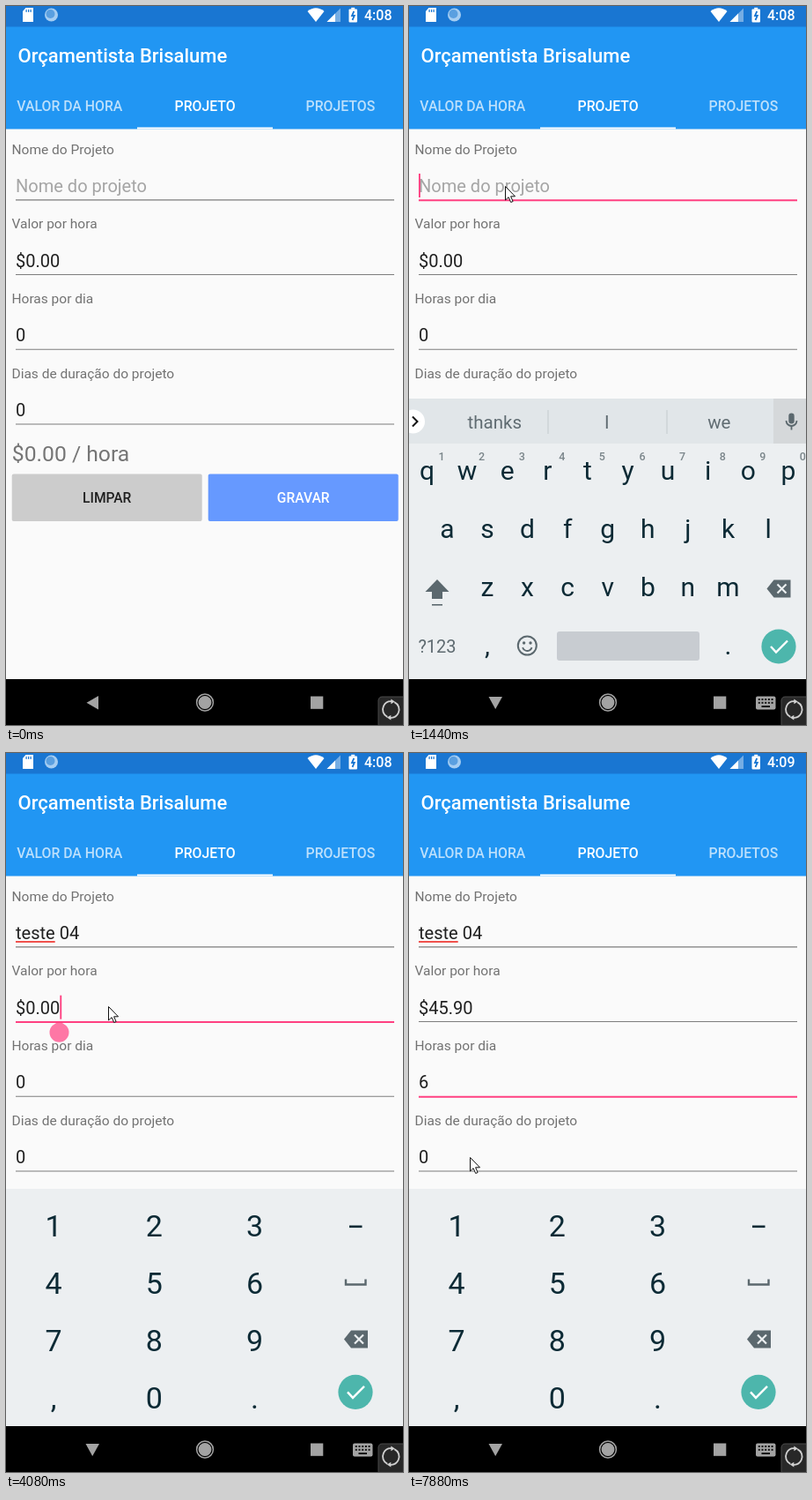
Write an HTML page with a canvas that moves like this. It is 451x815 px and loops after 8000 ms.

```html
<!DOCTYPE html>
<html lang="pt">
<head>
<meta charset="utf-8">
<title>Orçamentista Brisalume</title>
<style>
html, body { margin: 0; width: 100%; height: 100%; overflow: hidden; background: #fafafa; }
canvas { display: block; }
</style>
</head>
<body>
<canvas id="stage" width="451" height="815"></canvas>
<script>
const ctx = document.getElementById('stage').getContext('2d');
const under = document.createElement('canvas');
under.width = 451;
under.height = 815;

const LOOP = 8000, ROW = 84.7, TAU = 2 * Math.PI;
const PINK = '#ff4081', KEY = '#0c2a35', ICON = '#5b686e', NAV = '#a3a3a3', PANEL = '#eceff1';
const FOCUS = [980, 4000, 5600];

// Key i of a word is pressed at start + a*i + b*i*i
const keyTimes = (word, start, a, b) => [...word].map((_, i) => start + a * i + b * i * i);
const words = {
  name: ['teste 04', 1670, 100, 11],
  cents: ['4590', 4380, 250, -20],
  hours: ['6', 7190, 0, 0]
};
const typed = (key, t) => words[key][0].slice(0, keyTimes(...words[key]).filter(k => k <= t).length);

// The caret blinks with a one second period, restarted by focus and typing
const resets = [...FOCUS, ...Object.values(words).flatMap(w => keyTimes(...w))];
function caretOn(t) {
  const last = Math.max(...resets.filter(k => k <= t));
  return (t - last) % 1000 < 500;
}

// Each glide: start, duration, then a quadratic curve
const GLIDES = [
  [120, 540, [308, 753], [110, 0], [109, 204]],
  [3140, 540, [109, 204], [260, 430], [116, 287]],
  [4940, 310, [116, 287], [230, 372], [101, 371]],
  [7270, 610, [101, 371], [78, 508], [69, 458]]
];
function mousePos(t) {
  const glide = GLIDES.filter(g => g[0] <= t).pop();
  if (!glide) return null;
  const [start, span, a, b, c] = glide;
  const v = (1 - Math.min(1, (t - start) / span)) ** 2.5, u = 1 - v;
  return [0, 1].map(n => Math.round(v * v * a[n] + 2 * u * v * b[n] + u * u * c[n]));
}

function text(s, x, y, size, color, align = 'left', weight = 400) {
  ctx.font = `${weight} ${size}px Roboto, sans-serif`;
  ctx.textAlign = align;
  ctx.fillStyle = color;
  ctx.fillText(s, x, y);
}
function rect(x, y, w, h, color, r = 0) {
  ctx.fillStyle = color;
  ctx.beginPath();
  ctx.roundRect(x, y, w, h, r);
  ctx.fill();
}
function disc(x, y, r, color) {
  ctx.fillStyle = color;
  ctx.beginPath();
  ctx.arc(x, y, r, 0, TAU);
  ctx.fill();
}
function ring(x, y, r, color, w, a = 0, b = TAU) {
  ctx.strokeStyle = color;
  ctx.lineWidth = w;
  ctx.beginPath();
  ctx.arc(x, y, r, a, b);
  ctx.stroke();
}
function trace(pts) {
  ctx.beginPath();
  for (let i = 0; i < pts.length; i += 2) ctx.lineTo(pts[i], pts[i + 1]);
}
function poly(color, ...pts) {
  trace(pts);
  ctx.closePath();
  ctx.fillStyle = color;
  ctx.fill();
}
function line(color, w, ...pts) {
  trace(pts);
  ctx.strokeStyle = color;
  ctx.lineWidth = w;
  ctx.stroke();
}
function clipped(y, h, paint) {
  ctx.save();
  ctx.beginPath();
  ctx.rect(0, y, 451, h);
  ctx.clip();
  paint();
  ctx.restore();
}

function statusBar(t) {
  rect(0, 0, 451, 23.5, '#1976d2');
  poly('#fff', 22.5, 2, 31, 2, 31, 18, 19, 18, 19, 6);
  for (let i = 0; i < 3; i++) rect(22.5 + i * 2.5, 4, 1.2, 3, '#1976d2');
  disc(51.5, 10, 7.5, '#a5cdf2');
  disc(50.5, 9, 5, '#5a9fe0');

  ctx.fillStyle = '#fff';
  ctx.beginPath();
  ctx.moveTo(352, 18);
  ctx.lineTo(342.5, 6);
  ctx.quadraticCurveTo(352, -1.5, 361.5, 6);
  ctx.fill();
  poly('#75ade4', 380, 2.5, 380, 18, 364.5, 18);
  poly('#fff', 374, 8.5, 374, 18, 364.5, 18);
  rect(389.5, 3.5, 9.5, 15, '#fff', 1);
  rect(392.2, 1.8, 4, 2, '#fff');
  line('#1976d2', 1.8, 395.3, 6, 393, 11, 395.8, 11, 393.5, 16);
  text(t < 7040 ? '4:08' : '4:09', 407, 15.7, 16, '#fff', 'left', 500);
}

function header() {
  rect(0, 0, 451, 139.6, '#2196f3');
  text('Orçamentista Brisalume', 13.5, 63.5, 22, '#fff', 'left', 500);
  ['VALOR DA HORA', 'PROJETO', 'PROJETOS'].forEach((tab, i) =>
    text(tab, 72.3 + i * 153.8, 118.7, 15.8, i === 1 ? '#fff' : 'rgba(255,255,255,.7)', 'center', 500));
  rect(149, 137.4, 154, 2.2, '#fff');
}

function handle(x, y, age) {
  ctx.globalAlpha = Math.min(1, 0.3 + age / 200);
  ctx.fillStyle = PINK;
  ctx.beginPath();
  ctx.arc(x, y + 13, 11, -0.78, Math.PI + 0.78);
  ctx.lineTo(x, y);
  ctx.fill();
  ctx.globalAlpha = 1;
}

function form(t) {
  const focus = FOCUS.filter(f => f <= t).length - 1;
  const name = typed('name', t);
  const rate = '$' + (typed('cents', t) / 100).toFixed(2);
  const values = [name, rate, typed('hours', t) || '0', '0'];
  const labels = ['Nome do Projeto', 'Valor por hora', 'Horas por dia', 'Dias de duração do projeto'];

  labels.forEach((label, i) => {
    const y = i * ROW, value = values[i];
    text(label, 6.5, 167.5 + y, 15.5, '#727272');
    text(value || 'Nome do projeto', 11, 211 + y, 20.05, value ? '#202020' : '#a5a5a5');
    const w = ctx.measureText(value).width;
    if (i !== focus) return rect(11, 219.3 + y, 430, 1.1, '#7d7d7d');
    rect(11, 219.3 + y, 430, 2, PINK);
    if (caretOn(t)) rect(11 + w, 190 + y, 1.9, 27, PINK);
  });

  // Spelling mark once the word is finished, composing line before
  const word = name.trim().split(' ')[0], done = name.includes(' ');
  rect(11, 213, ctx.measureText(word).width, done ? 2 : 1, done ? '#f0524d' : '#303030');

  text('$0.00 / hora', 6.8, 516.4, 24.7, '#757575');
  ['LIMPAR', 'GRAVAR'].forEach((label, i) => {
    const x = 6.7 + i * 223;
    rect(x, 530.5, 216, 53.5, i ? '#6699ff' : '#cccccc', 2);
    text(label, x + 108, 563, 15.6, i ? '#fff' : '#202020', 'center', 500);
  });

  if (focus === 1 && t >= 4070 && t < 4380) handle(60.5, 303.7, t - 4000);
  if (focus === 2 && t < 7190) handle(22, 388.7, t - 5600);
}

function backspace(x, y) {
  poly(ICON, x, y, x + 8, y - 10, x + 27, y - 10, x + 27, y + 10, x + 8, y + 10);
  for (const d of [-5, 5]) line(PANEL, 2.2, x + 12, y - d, x + 22, y + d);
}
function enter(x, y) {
  disc(x, y, 19.6, '#4db6ac');
  line('#fff', 2.4, x - 9, y, x - 3, y + 6.5, x + 10, y - 6.5);
}

function suggestions(name) {
  rect(0, 445, 451, 51, '#e1e6e9');
  rect(414, 445, 37, 51, '#d5d8da');
  disc(4.5, 471, 13.5, '#fff');
  line('#111', 2, 4, 465.5, 9.5, 471, 4, 476.5);

  if (!name.includes(' ')) {
    const hints = name ? ['test', 'testing', 'tests'] : ['thanks', 'I', 'we'];
    hints.forEach((hint, i) => {
      text(hint, 97.3 + i * 127.5, 478.6, 20.5, '#606c72', 'center');
      if (i) rect(22.5 + i * 135, 458, 1, 27, '#c3c9cd');
    });
  }
  rect(431.3, 461.5, 6.4, 12, ICON, 3.2);
  ring(434.5, 470, 6, ICON, 1.8, 0, Math.PI);
  rect(433.6, 475.5, 1.8, 5, ICON);
}

function letters(t) {
  rect(0, 496, 451, 267, PANEL);
  suggestions(typed('name', t));

  ['qwertyuiop', 'asdfghjkl', 'zxcvbnm'].forEach((keys, r) => [...keys].forEach((k, i) => {
    const x = 20.5 + (i + r * (r + 1) / 4) * 45.6;
    text(k, x, 537.4 + r * 66, 30, KEY, 'center');
    if (!r) text((i + 1) % 10, x + 16.5, 515.3, 12.5, '#7a858a', 'center', 500);
  }));

  poly(ICON, 32, 650, 45.5, 664, 18.5, 664);
  rect(26, 663, 12, 9, ICON);
  rect(26, 678, 12, 1.6, ICON);
  backspace(406.5, 660.5);

  text('?123', 32, 732.5, 20, '#5f6b71', 'center');
  text(',', 89, 734.5, 30, KEY, 'center');
  text('.', 362.5, 735, 30, KEY, 'center');
  ring(134.3, 725, 10.5, ICON, 2);
  for (const d of [-3.7, 3.7]) disc(134.3 + d, 722, 1.7, ICON);
  ring(134.3, 725.5, 5.5, ICON, 1.8, 0.3, Math.PI - 0.3);
  rect(168, 709, 162, 33, '#c8ccd1', 3);
  enter(420, 726);
}

function digits() {
  rect(0, 494, 451, 269, PANEL);
  [...'123456789,0.'].forEach((k, i) =>
    text(k, 54 + (i % 3) * 114.3, 548.2 + Math.floor(i / 3) * 64.8, 34, KEY, 'center'));
  rect(390, 535.5, 14.5, 2.6, KEY);
  line(ICON, 2.4, 386, 596.5, 386, 602.5, 408.5, 602.5, 408.5, 596.5);
  backspace(384, 664.5);
  enter(397, 724.4);
}

function keyboard(t) {
  if (t < 1210) return;
  if (t >= FOCUS[1]) return digits();
  const p = Math.min(1, (t - 1210) / 230);
  const dy = 36 * (1 - p ** 1.6), alpha = Math.min(1, 0.45 + 0.7 * p);
  if (p === 1) return letters(t);

  // Fade the sliding panel by veiling it with the form beneath
  under.getContext('2d').drawImage(ctx.canvas, 0, 0);
  clipped(445 + dy, 318 - dy, () => {
    ctx.translate(0, dy);
    letters(t);
    ctx.translate(0, -dy);
    ctx.globalAlpha = 1 - alpha;
    ctx.drawImage(under, 0, 0);
  });
  clipped(763, dy, () => {
    ctx.globalAlpha = alpha;
    rect(0, 763, 451, dy, PANEL);
    ctx.globalAlpha = 1;
    disc(420, 726 + dy, 19.6, '#000');
  });
}

function navBar(t) {
  rect(0, 763, 451, 52, '#000');
  if (t < 1060) poly(NAV, 91.5, 789.7, 105, 782, 105, 797.4);
  else {
    poly(NAV, 90.5, 783, 106, 783, 98.2, 797);
    rect(394, 782.5, 22.5, 15, NAV, 2);
    for (let i = 0; i < 10; i++)
      rect(396.8 + (i % 5) * 3.7, 785 + Math.floor(i / 5) * 3.8, 2, 2, '#111');
    rect(400.5, 793, 9.5, 2, '#111');
  }
  disc(226, 789.5, 7.4, NAV);
  ring(226, 789.5, 9.4, NAV, 1.5);
  rect(346, 782.5, 14.3, 14.3, NAV);
}

function rotateButton() {
  rect(422.5, 782.5, 34, 36, '#4a4a4a', 5);
  rect(423.5, 783.5, 34, 36, '#282828', 4);
  for (let i = 0; i < 2; i++) {
    ctx.save();
    ctx.translate(437.3, 797.5);
    ctx.rotate(Math.PI * (i + 0.5));
    ring(0, 0, 9.3, '#d0d0d0', 1.8, -2.7, 0.1);
    poly('#d0d0d0', 6.3, 0, 12, 0, 9, 4.5);
    ctx.restore();
  }
}

function mouse(t) {
  const p = mousePos(t);
  if (!p) return;
  ctx.save();
  ctx.translate(p[0] + 0.5, p[1] + 0.5);
  const shape = [0, 0, 0, 15.5, 3.6, 12.2, 6.2, 18, 8.6, 17, 6.1, 11.3, 11, 11.3];
  poly('#fff', ...shape);
  line('#111', 1, ...shape, 0, 0);
  ctx.restore();
}

function draw(t) {
  rect(0, 0, 451, 815, '#fafafa');
  header();
  statusBar(t);
  form(t);
  navBar(t);
  keyboard(t);
  rotateButton();
  mouse(t);
}

const begin = performance.now();
function frame() {
  draw((performance.now() - begin) % LOOP);
  requestAnimationFrame(frame);
}
frame();
</script>
</body>
</html>
```
